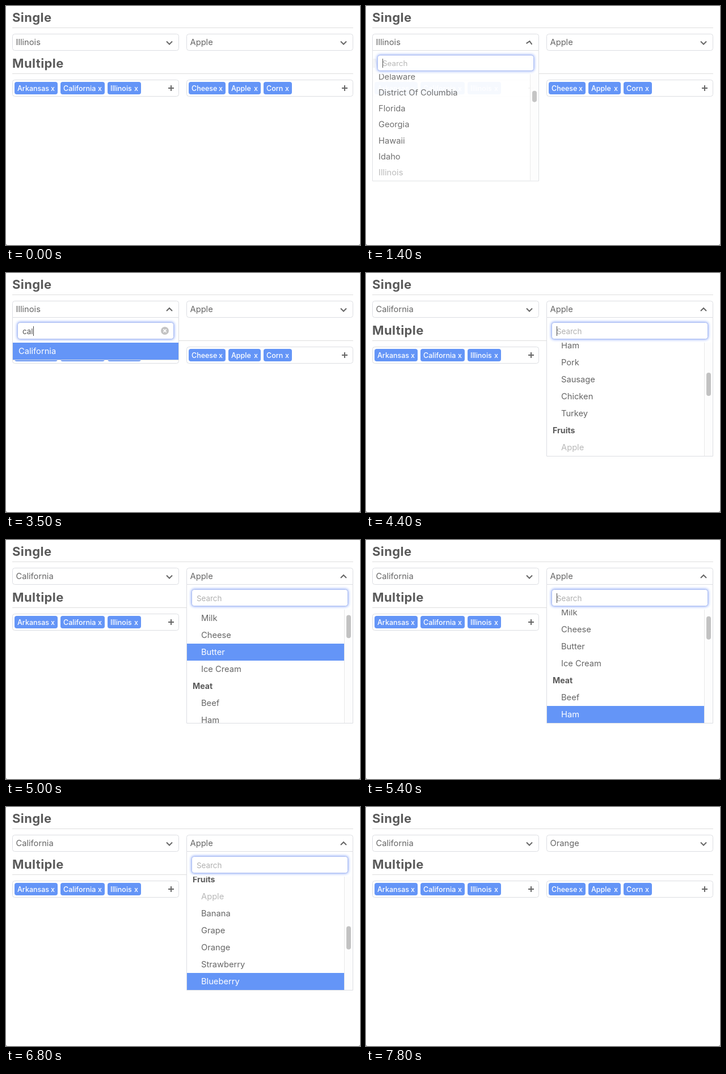
Write an HTML page with a canvas that moves like this. It is 624 px wide and 422 px high and loops after 8000 ms.

```html
<!DOCTYPE html>
<html lang="en">
<head>
<meta charset="utf-8">
<title>Select boxes</title>
<style>
html, body { margin: 0; width: 100%; height: 100%; overflow: hidden; background: #fff; }
canvas { display: block; }
</style>
</head>
<body>
<canvas id="stage" width="624" height="422"></canvas>
<script>
const ctx = document.getElementById('stage').getContext('2d');
const LOOP = 8000, STEP = 100;
const BLUE = '#6495f7', BORDER = '#dcdee2', INK = '#666', HEAD = '#5a5a5a', FAINT = '#b8b8b8';
const ROW = 30, LIST_TOP = 123, LIST_H = 200, PANEL_TOP = 78, BOX_W = 294;
const LEFT = 11, RIGHT = 318;

const STATES = ('Alabama,Alaska,Arizona,Arkansas,California,Colorado,Connecticut,Delaware,' +
  'District Of Columbia,Florida,Georgia,Hawaii,Idaho,Illinois,Indiana,Iowa,Kansas,Kentucky,' +
  'Louisiana,Maine,Maryland,Massachusetts,Michigan,Minnesota,Mississippi,Missouri,Montana,' +
  'Nebraska,Nevada,New Hampshire,New Jersey,New Mexico,New York,North Carolina,North Dakota,' +
  'Ohio,Oklahoma,Oregon,Pennsylvania,Rhode Island,South Carolina,South Dakota,Tennessee,Texas,' +
  'Utah,Vermont,Virginia,Washington,West Virginia,Wisconsin,Wyoming').split(',');

// '#' marks a group label
const FOODS = ('#Dairy,Milk,Cheese,Butter,Ice Cream,#Meat,Beef,Ham,Pork,Sausage,Chicken,Turkey,' +
  '#Fruits,Apple,Banana,Grape,Orange,Strawberry,Blueberry,Cherry,#Vegetables,Carrot,Corn,' +
  'Lettuce,Onion,Pepper,Potato,Spinach,Tomato').split(',');

// [time, highlighted row] as the arrow keys are pressed
const KEYS = [[4800, 1], [4900, 2], [5000, 3], [5200, 4], [5300, 6], [5400, 7], [5500, 8],
  [5700, 9], [5800, 10], [5900, 11], [6100, 14], [6200, 15], [6300, 16], [6500, 17],
  [6600, 18], [7000, 17], [7100, 16]];

// CSS "ease": cubic-bezier(.25, .1, .25, 1)
function ease(p) {
  if (p <= 0) return 0;
  if (p >= 1) return 1;
  let lo = 0, hi = 1, u = 0.5;
  for (let i = 0; i < 24; i++) {
    u = (lo + hi) / 2;
    const x = 0.75 * u * (1 - u) + u * u * u;
    if (x < p) lo = u; else hi = u;
  }
  return 0.3 * u * (1 - u) * (1 - u) + 3 * u * u * (1 - u) + u * u * u;
}

const ramp = (t, from, to) => ease((t - from) / (to - from));

function text(str, x, y, size, color, weight = 400, spacing = 0) {
  ctx.font = `${weight} ${size}px Inter, sans-serif`;
  ctx.letterSpacing = spacing + 'px';
  ctx.fillStyle = color;
  ctx.fillText(str, x, y);
}

function rect(x, y, w, h, color) {
  ctx.fillStyle = color;
  ctx.fillRect(x, y, w, h);
}

function rounded(x, y, w, h, r, fill, stroke) {
  ctx.beginPath();
  ctx.roundRect(x, y, w, h, r);
  if (fill) { ctx.fillStyle = fill; ctx.fill(); }
  if (stroke) { ctx.strokeStyle = stroke; ctx.lineWidth = 1; ctx.stroke(); }
}

function lines(color, width, ...paths) {
  ctx.strokeStyle = color;
  ctx.lineWidth = width;
  ctx.beginPath();
  for (const path of paths) path.forEach(([x, y], i) => i ? ctx.lineTo(x, y) : ctx.moveTo(x, y));
  ctx.stroke();
}

function heading(str, baseline) {
  text(str, 11, baseline, 22, HEAD, 700, 0.4);
  rect(11, baseline + 10, 601, 1, '#dedede');
}

function single(x, value, open) {
  const r = open > 0 ? [4, 4, 0, 0] : 4;
  rounded(x + 0.5, 49.5, BOX_W - 1, 29, r, '#fff', BORDER);
  text(value, x + 6.5, 69, 14.7, INK);
  ctx.save();
  ctx.translate(x + 277, 65 - 0.5 * open);
  ctx.rotate(-Math.PI * open);
  lines(INK, 2, [[-5, -2.5], [0, 2.5], [5, -2.5]]);
  ctx.restore();
}

// tags: [label, left, right]
function multiple(x, plusX, tags) {
  rounded(x + 0.5, 130.5, BOX_W - 1, 29, 4, '#fff', BORDER);
  for (const [label, l, r] of tags) {
    rounded(l, 134, r - l, 22, 4, BLUE);
    text(label, l + 5, 150, 12.5, '#fff', 500);
    text('x', r - 12, 150, 12.5, '#fff', 500);
  }
  rect(plusX - 5, 144, 10, 2, INK);
  rect(plusX - 1, 140, 2, 10, INK);
}

function searchField(x, query, caret) {
  ctx.save();
  ctx.shadowColor = '#7d9df5';
  ctx.shadowBlur = 5;
  rounded(x + 9.5, 87.5, 275, 29, 4, '#fff', '#b3c4f5');
  ctx.restore();
  rounded(x + 9.5, 87.5, 275, 29, 4, '#fff', '#aebff3');
  text(query || 'Search', x + 18, 108, 13.4, query ? '#555' : '#b0b0b0');
  const w = query ? ctx.measureText(query).width : 0;
  if (caret) rect(Math.round(x + 18 + w), 94, 1, 17, '#444');
  if (query) {
    ctx.fillStyle = '#c3c3c3';
    ctx.beginPath();
    ctx.arc(x + 269, 102, 7, 0, 7);
    ctx.fill();
    const cx = x + 269;
    lines('#fff', 1.6, [[cx - 2.6, 99.4], [cx + 2.6, 104.6]], [[cx + 2.6, 99.4], [cx - 2.6, 104.6]]);
  }
}

function list(x, { items, value, active, scroll, grouped }) {
  const full = items.length * ROW;
  const h = Math.min(full, LIST_H);
  const bar = full > LIST_H;
  const w = BOX_W - 2 - (bar ? 15 : 0);
  ctx.save();
  ctx.beginPath();
  ctx.rect(x + 1, LIST_TOP, BOX_W - 2, h);
  ctx.clip();
  items.forEach((item, i) => {
    const y = LIST_TOP + i * ROW - scroll;
    if (y < LIST_TOP - ROW || y > LIST_TOP + h) return;
    if (item[0] === '#') {
      text(item.slice(1), x + 11, y + 20, 14.2, HEAD, 700);
      return;
    }
    const on = item === active;
    if (on) rect(x + 1, y, w, ROW, BLUE);
    const color = on ? '#fff' : item === value ? FAINT : INK;
    text(item, x + (grouped ? 26 : 11), y + 20, 14.7, color);
  });
  if (bar) {
    rect(x + 278, LIST_TOP, 15, h, '#fdfdfd');
    rect(x + 278, LIST_TOP, 1, h, '#e9e9e9');
    const k = h / full;
    rounded(x + 282, LIST_TOP + 2.5 + scroll * k, 8, h * k - 5, 4, '#c2c2c2');
  }
  ctx.restore();
}

function panel(x, open, state) {
  if (open <= 0) return;
  const h = Math.min(state.items.length * ROW, LIST_H);
  ctx.save();
  ctx.globalAlpha = open;
  ctx.translate(0, PANEL_TOP);
  ctx.scale(1, open);
  ctx.translate(0, -PANEL_TOP);
  rounded(x + 0.5, PANEL_TOP + 0.5, BOX_W - 1, LIST_TOP + h - PANEL_TOP, 0, '#fff', BORDER);
  searchField(x, state.query, state.caret);
  list(x, state);
  ctx.restore();
}

const bottomScroll = row => (row + 1) * ROW - LIST_H;

function stateSearch(t) {
  const done = t >= 3800;
  const query = done || t < 2300 ? '' : t < 2400 ? 'c' : t < 2600 ? 'ca' : 'cal';
  // filtering lags behind the first letters
  const filter = done || t < 2400 ? '' : t < 2500 ? 'c' : query;
  return {
    items: STATES.filter(s => s.toLowerCase().includes(filter)),
    value: done ? 'California' : 'Illinois',
    active: t >= 3500 && !done ? 'California' : '',
    scroll: filter || done ? 0 : bottomScroll(STATES.indexOf('Illinois')),
    query,
    caret: !(t >= 1800 && t < 2300) && !(t >= 3000 && t < 3500)
  };
}

function foodSearch(t) {
  let scroll = bottomScroll(FOODS.indexOf('Apple'));
  let row = -1;
  for (const [time, next] of KEYS) {
    if (time > t) break;
    row = next;
    scroll = Math.max(Math.min(scroll, row * ROW), bottomScroll(row));
  }
  const done = t >= 7500;
  return {
    items: FOODS,
    value: done ? 'Orange' : 'Apple',
    active: done ? '' : FOODS[row],
    scroll,
    grouped: true,
    query: '',
    caret: (t - 4300) % 1000 < 500
  };
}

function draw(t) {
  const states = stateSearch(t), foods = foodSearch(t);
  const openL = ramp(t, 1260, 1460) - ramp(t, 3750, 3900);
  const openR = ramp(t, 4220, 4400) - ramp(t, 7580, 7780);

  rect(0, 0, 624, 422, '#8c8c8c');
  rounded(0, 0, 624, 422, [1, 1, 3, 3], '#fff');

  heading('Single', 28);
  single(LEFT, states.value, openL);
  single(RIGHT, foods.value, openR);

  heading('Multiple', 109);
  multiple(LEFT, 291, [['Arkansas', 15, 91], ['California', 96, 174], ['Illinois', 179, 238]]);
  multiple(RIGHT, 597, [['Cheese', 322, 387], ['Apple', 392, 449], ['Corn', 454, 504]]);

  panel(LEFT, openL, states);
  panel(RIGHT, openR, foods);
}

const start = performance.now();
function tick() {
  const t = (performance.now() - start) % LOOP;
  draw(Math.floor(t / STEP) * STEP);
  requestAnimationFrame(tick);
}
tick();
</script>
</body>
</html>
```
